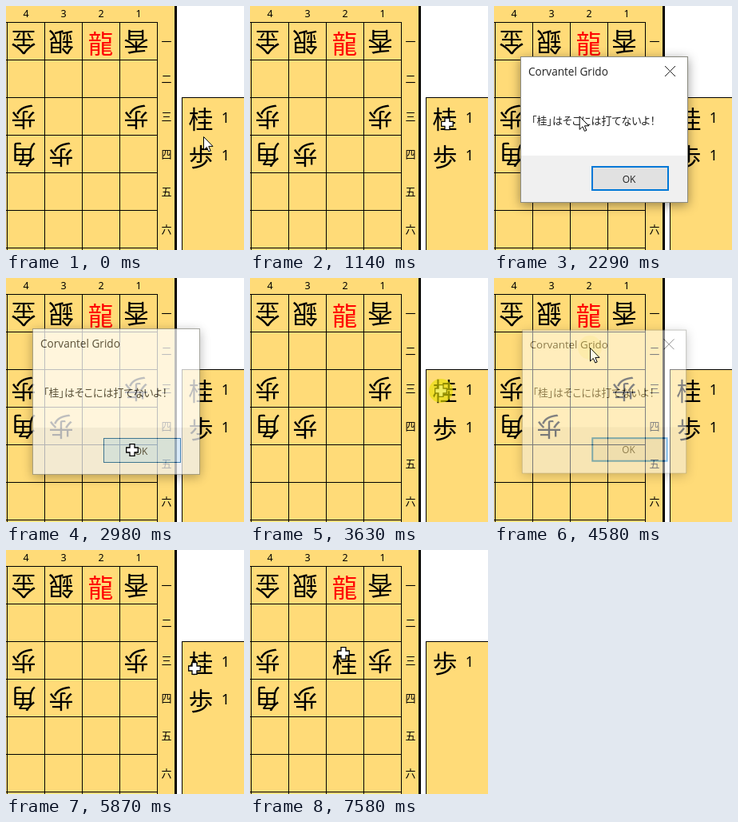
These frames come from a looping animation (298 px wide and 305 px high, 8210 ms). An HTML page:

```html
<!DOCTYPE html>
<html lang="ja">
<head>
<meta charset="utf-8">
<title>Shogi drop</title>
<style>
html, body { margin: 0; width: 100%; height: 100%; overflow: hidden; background: #fff; }
svg { display: block; width: 298px; height: 305px; }
text { font-family: "Noto Sans CJK JP", "Noto Sans CJK", sans-serif; text-anchor: middle; }
.num { font-family: "Noto Sans", sans-serif; }
.piece { font-weight: 500; }
#dialog { transform-origin: 138px 155px; }
#dialog text { fill: #222; }
#frame { filter: drop-shadow(0 3px 7px rgba(0, 0, 0, .4)); }
#title { font: 13.6px "Open Sans", sans-serif; text-anchor: start; }
#message { font-size: 13px; font-feature-settings: "palt"; text-anchor: start; }
#ok { font: 12px "Open Sans", sans-serif; }
</style>
</head>
<body>
<svg viewBox="0 0 298 305">
  <rect width="212" height="305" fill="#ffdb78"/>
  <rect x="211" width="3" height="305"/>
  <rect x="220.5" y="114.5" width="90" height="200" fill="#ffdb78" stroke="#000"/>
  <path id="grid" stroke="#000" fill="none"/>
  <g id="board"></g>
  <g id="dropped"></g>
  <g id="handBefore"></g>
  <g id="handAfter"></g>
  <g id="dialog">
    <rect id="frame" x="33.5" y="63.5" width="209" height="182" fill="#fff" stroke="#8a8a80"/>
    <rect x="34" y="187" width="208" height="58" fill="#f0f0f0"/>
    <text id="title" x="43" y="87">Corvantel Grido</text>
    <path id="close" d="M214 75l13 13M227 75l-13 13" stroke="#222" fill="none"/>
    <text id="message" x="47" y="148">「桂」はそこには打てないよ！</text>
    <rect x="123" y="201" width="95" height="29" fill="#e1e1e1" stroke="#0078d7" stroke-width="2"/>
    <rect id="pressed" x="122.5" y="200.5" width="96" height="30" fill="#cce4f7" stroke="#005499"/>
    <text id="ok" x="169" y="220.5">OK</text>
  </g>
  <g id="cursor" fill="#fff" stroke="#000">
    <path id="arrow" d="M.5 .5V17L4.3 13.4L6.8 19L9.2 18L6.8 12.4H12Z"/>
    <path id="cross" stroke-width="1.3" d="M-3 -7.3H3V-3H7.3V3H3V7.3H-3V3H-7.3V-3H-3Z"/>
    <circle id="flash" r="15" fill="#e6e000" stroke="none"/>
  </g>
</svg>
<script>
const LOOP = 8210, CELL = 47;
const $ = id => document.getElementById(id);

function label(parent, str, x, y, size, cls = '', turn = 0, fill = '#000') {
  const el = document.createElementNS('http://www.w3.org/2000/svg', 'text');
  const shift = cls === 'num' ? .357 : .38;
  const attrs = { x, y: y + size * shift, 'font-size': size, class: cls, fill };
  if (turn) attrs.transform = `rotate(${turn} ${x} ${y})`;
  for (const key in attrs) el.setAttribute(key, attrs[key]);
  el.textContent = str;
  $(parent).append(el);
}

function piece(parent, str, col, row, own = false, fill) {
  const lean = own ? 2.5 : 0;
  label(parent, str, 22 + col * CELL + lean, 45 + row * CELL + lean, 31.5, 'piece', own ? 0 : 180, fill);
}

function hand(parent, str, row) {
  const y = 141 + row * CELL;
  label(parent, str, 244, y, 31, 'piece');
  label(parent, '1', 275, y - 1.5, 18, 'num');
}

let grid = '';
for (let i = 0; i < 5; i++) grid += `M${i * CELL + 1.5} 20V305`;
for (let i = 0; i < 7; i++) grid += `M0 ${i * CELL + 20.5}H190`;
$('grid').setAttribute('d', grid);
[...'4321'].forEach((c, i) => label('board', c, 25 + i * CELL, 9.5, 12.5, 'num'));
[...'一二三四五六'].forEach((c, i) => label('board', c, 201, 44 + i * CELL, 13));

['金銀 香', '', '歩  歩', '角歩'].forEach((line, row) =>
  [...line].forEach((c, col) => c !== ' ' && piece('board', c, col, row)));
piece('board', '龍', 2, 0, true, '#f00');
piece('dropped', '桂', 2, 2, true);
hand('handBefore', '桂', 0);
hand('handBefore', '歩', 1);
hand('handAfter', '歩', 0);

// Cursor trips: leave, arrive, x, y; a swing curves out past the hand first
const START = [247, 163], OK = [158, 215], SWING = [285, 235];
const trips = [
  [70, 190, 243, 137],
  [1070, 1560, 70, 82, SWING],
  [2140, 2480, ...OK],
  [3050, 3560, 239, 141],
  [3700, 4210, 120, 87, SWING],
  [4650, 4920, ...OK],
  [5490, 5870, 236, 148],
  [6190, 6900, 117, 129, SWING]
];
const clicks = [440, 1590, 2480, 3630, 4350, 4920, 6120, 6970];
const warnings = [1910, 4350];

const ramp = (t, from, span) => Math.min(1, Math.max(0, (t - from) / span));
const ease = p => p * p * (3 - 2 * p);
const show = (id, opacity) => { $(id).style.opacity = +opacity; };

function cursorAt(t) {
  let pos = START;
  for (const [leave, arrive, x, y, bend] of trips) {
    if (t < leave) break;
    const p = ease(ramp(t, leave, arrive - leave)), end = [x, y];
    pos = pos.map((a, i) => {
      const mid = bend ? bend[i] : (a + end[i]) / 2;
      return (1 - p) ** 2 * a + 2 * p * (1 - p) * mid + p * p * end[i];
    });
  }
  return pos;
}

function render(t) {
  const [x, y] = cursorAt(t);
  $('cursor').setAttribute('transform', `translate(${x} ${y})`);
  const click = clicks.findLast(c => c <= t) ?? -LOOP;
  show('flash', .62 * (1 - ramp(t, click, 250) ** 2));

  // Time since the latest refused drop
  const u = t - (warnings.findLast(w => w <= t) ?? -LOOP);
  const opened = ramp(u, 150, 160), closing = u >= 1030;
  show('dialog', opened * (1 - ramp(u, 1030, 160)));
  $('dialog').style.transform = `scale(${.965 + .035 * opened})`;
  show('pressed', u >= 570);
  show('close', !closing);

  const pointing = t < 690 || !closing;
  show('arrow', pointing);
  show('cross', !pointing);

  show('dropped', t >= 6970);
  show('handBefore', t < 7090);
  show('handAfter', t >= 7090);
}

const begin = performance.now();
function tick() {
  render((performance.now() - begin) % LOOP);
  requestAnimationFrame(tick);
}
tick();
</script>
</body>
</html>
```
